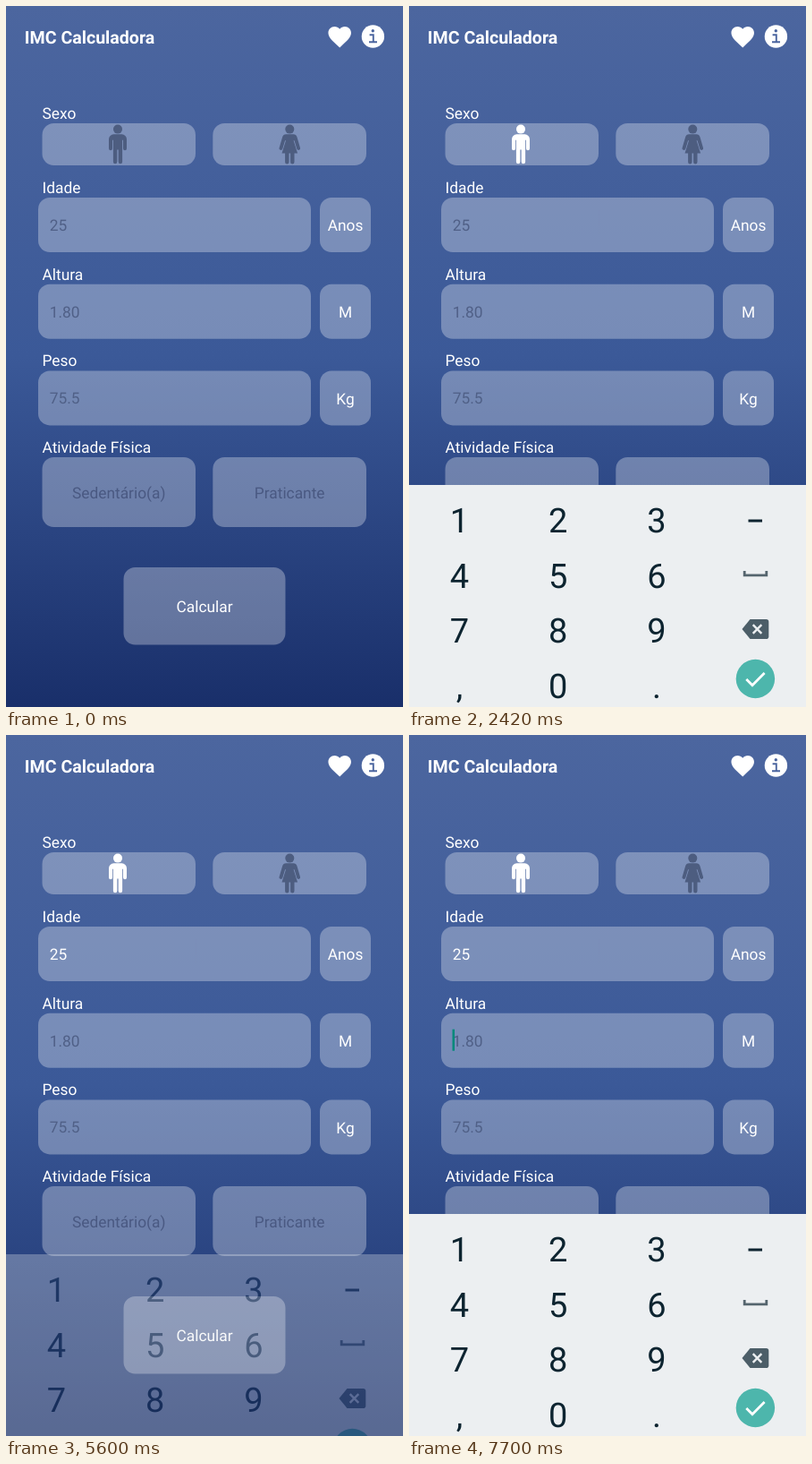
An HTML page for the animation above (8000 ms loop, 444 by 783 pixels).

```html
<!DOCTYPE html>
<html lang="pt">
<head>
<meta charset="utf-8">
<title>IMC Calculadora</title>
<style>
  html, body { margin: 0; width: 100%; height: 100%; overflow: hidden; background: #4c669f; }
  svg { display: block; width: 100vw; height: 100vh; }
  text { font: 17.35px Roboto, sans-serif; fill: #fff; text-rendering: geometricPrecision; }
  .title { font-size: 19.6px; font-weight: 700; }
  .mid { text-anchor: middle; }
  .panel { fill: #fff; fill-opacity: .3; }
  .hint { fill: #506087; }
  .choice { fill: #4a5982; }
  .key { font-size: 38px; fill: #0d2430; text-anchor: middle; }
</style>
</head>
<body>
<svg viewBox="0 0 444 783" preserveAspectRatio="none">
  <defs>
    <linearGradient id="sky" x2="0" y2="1">
      <stop stop-color="#4c669f"/>
      <stop offset=".5" stop-color="#3b5998"/>
      <stop offset="1" stop-color="#192f6a"/>
    </linearGradient>
  </defs>
  <rect width="444" height="783" fill="url(#sky)"/>

  <text class="title" x="20.8" y="42">IMC Calculadora</text>
  <path transform="translate(357.9 19.2) scale(1.275)" fill="#fff" d="M12 21.35l-1.45-1.32C5.4 15.36 2 12.28 2 8.5 2 5.42 4.42 3 7.5 3c1.74 0 3.41.81 4.5 2.09C13.09 3.81 14.76 3 16.5 3 19.58 3 22 5.42 22 8.5c0 3.78-3.4 6.86-8.55 11.54z"/>
  <circle cx="410.4" cy="34" r="12.7" fill="#fff"/>
  <circle cx="410.3" cy="27.7" r="1.7" fill="#4b659f"/>
  <path d="M406.6 32.2H410.8V40.2M406 40.2H415" fill="none" stroke="#4b659f" stroke-width="1.9"/>

  <g id="form"></g>
  <g id="male">
    <rect class="panel" x="40.5" y="131" width="171.5" height="47" rx="13"/>
    <g id="man">
      <circle cx="125" cy="137.6" r="5"/>
      <path d="M120.5 143.3h9a5.5 5.5 0 0 1 5.5 5.5v10.5a2 2 0 0 1-4 0v-9.5h-.9v24.2a2.2 2.2 0 0 1-4.4 0v-13.5h-1.4v13.5a2.2 2.2 0 0 1-4.4 0v-24.2h-.9v9.5a2 2 0 0 1-4 0v-10.5a5.5 5.5 0 0 1 5.5-5.5z"/>
    </g>
  </g>
  <g transform="translate(317.3 0)" fill="#4d5d80">
    <circle cy="137.6" r="5"/>
    <path d="M-4 143.3H4Q7.2 143.3 8.2 146.5L11.7 158.4A1.9 1.9 0 0 1 8 159.6L5.2 150.2H4.3L8.8 164.5H5.2V174.2A2.2 2.2 0 0 1 .8 174.2V164.5H-.8V174.2A2.2 2.2 0 0 1-5.2 174.2V164.5H-8.8L-4.3 150.2H-5.2L-8 159.6A1.9 1.9 0 0 1-11.7 158.4L-8.2 146.5Q-7.2 143.3-4 143.3Z"/>
  </g>
  <text id="age" x="48.7" y="250.8"></text>
  <rect id="caret" width="2.5" height="24" fill="#00897b"/>

  <g id="keyboard">
    <rect y="535" width="444" height="248" fill="#eceff1"/>
    <g id="keys"></g>
    <path d="M379.5 575H395" stroke="#0d2430" stroke-width="3"/>
    <path d="M375.2 631V635.8H399.8V631" fill="none" stroke="#55656e" stroke-width="2.8"/>
    <path d="M381.5 685H399.5Q402.3 685 402.3 687.8V704.2Q402.3 707 399.5 707H381.5L372.5 696Z" fill="#4c5e68"/>
    <path d="M384.7 691.2l9.6 9.6m0-9.6l-9.6 9.6" stroke="#eceff1" stroke-width="2.4"/>
    <circle cx="387.4" cy="751.5" r="21.7" fill="#4db6ac"/>
    <path d="M377.3 752l6.7 6.7 13.6-13.6" fill="none" stroke="#fff" stroke-width="2.8"/>
  </g>
</svg>
<script>
const LOOP = 8000;
const $ = id => document.getElementById(id);

const text = (x, y, value, cls = '') => `<text class="${cls}" x="${x}" y="${y}">${value}</text>`;
const panel = (x, y, w, h) => `<rect class="panel" x="${x}" y="${y}" width="${w}" height="${h}" rx="13"/>`;

const fields = [['Idade', '', 'Anos'], ['Altura', '1.80', 'M'], ['Peso', '75.5', 'Kg']];
$('form').innerHTML = text(40.5, 126.2, 'Sexo') + panel(231.3, 131, 171.7, 47) +
  fields.map(([label, hint, unit], i) => {
    const y = 214 + i * 96.7;
    return text(40.5, y - 5, label) + panel(36, y, 305, 61) + panel(351, y, 57, 61) +
      text(48.7, y + 36.8, hint, 'hint') + text(379.5, y + 37.3, unit, 'mid');
  }).join('') +
  text(40.5, 499.2, 'Atividade Física') +
  panel(40.5, 504, 171.5, 78) + text(126.2, 550.2, 'Sedentário(a)', 'mid choice') +
  panel(231.3, 504, 171.7, 78) + text(317.2, 550.2, 'Praticante', 'mid choice') +
  panel(131.5, 627, 181, 86.5) + text(222, 677.2, 'Calcular', 'mid');

$('keys').innerHTML = ['123', '456', '789', ',0.'].map((row, r) =>
  [...row].map((key, c) => text(56.5 + c * 110.2, 588.3 + r * 61.5, key, 'key')).join('')).join('');

// Each track is a list of [start, value]; a value holds until the next start.
const pressOpacity = [[0, 1], [500, .2], [730, .36], [800, .74], [880, .97], [1800, 1]];
const caretSpots = [[0, null],
  [1800, [48.5, 232]], [2420, null], [2880, [48.5, 232]], [3350, null], [3900, [48.5, 232]],
  [4210, [58, 232]], [4590, [67.3, 232]], [5140, null],
  [6610, [48.5, 328.7]], [7230, null], [7700, [48.5, 328.7]]];
const typedAge = [[0, ''], [4210, '2'], [4590, '25']];
const hidden = [0, 0], entering = [31, .67], settling = [7, .94], open = [0, 1];
const keyboardPose = [[0, hidden],
  [2260, entering], [2340, settling], [2420, open],
  [5450, [4, .95]], [5530, [20, .7]], [5600, [45, .3]], [5680, hidden],
  [6850, entering], [6930, settling], [7000, open]];

function at(track, t) {
  let value;
  for (const [start, v] of track) if (t >= start) value = v;
  return value;
}

function render(t) {
  $('male').setAttribute('opacity', at(pressOpacity, t));
  $('man').setAttribute('fill', t < 730 ? '#4d5d80' : '#fff');

  const typed = at(typedAge, t);
  $('age').textContent = typed || '25';
  $('age').setAttribute('class', typed ? '' : 'hint');

  const spot = at(caretSpots, t);
  $('caret').setAttribute('opacity', spot ? 1 : 0);
  if (spot) {
    $('caret').setAttribute('x', spot[0]);
    $('caret').setAttribute('y', spot[1]);
  }

  const [drop, alpha] = at(keyboardPose, t);
  $('keyboard').setAttribute('transform', `translate(0 ${drop})`);
  $('keyboard').setAttribute('opacity', alpha);
}

const begin = performance.now();
function tick() {
  render((performance.now() - begin) % LOOP);
  requestAnimationFrame(tick);
}
tick();
</script>
</body>
</html>
```
